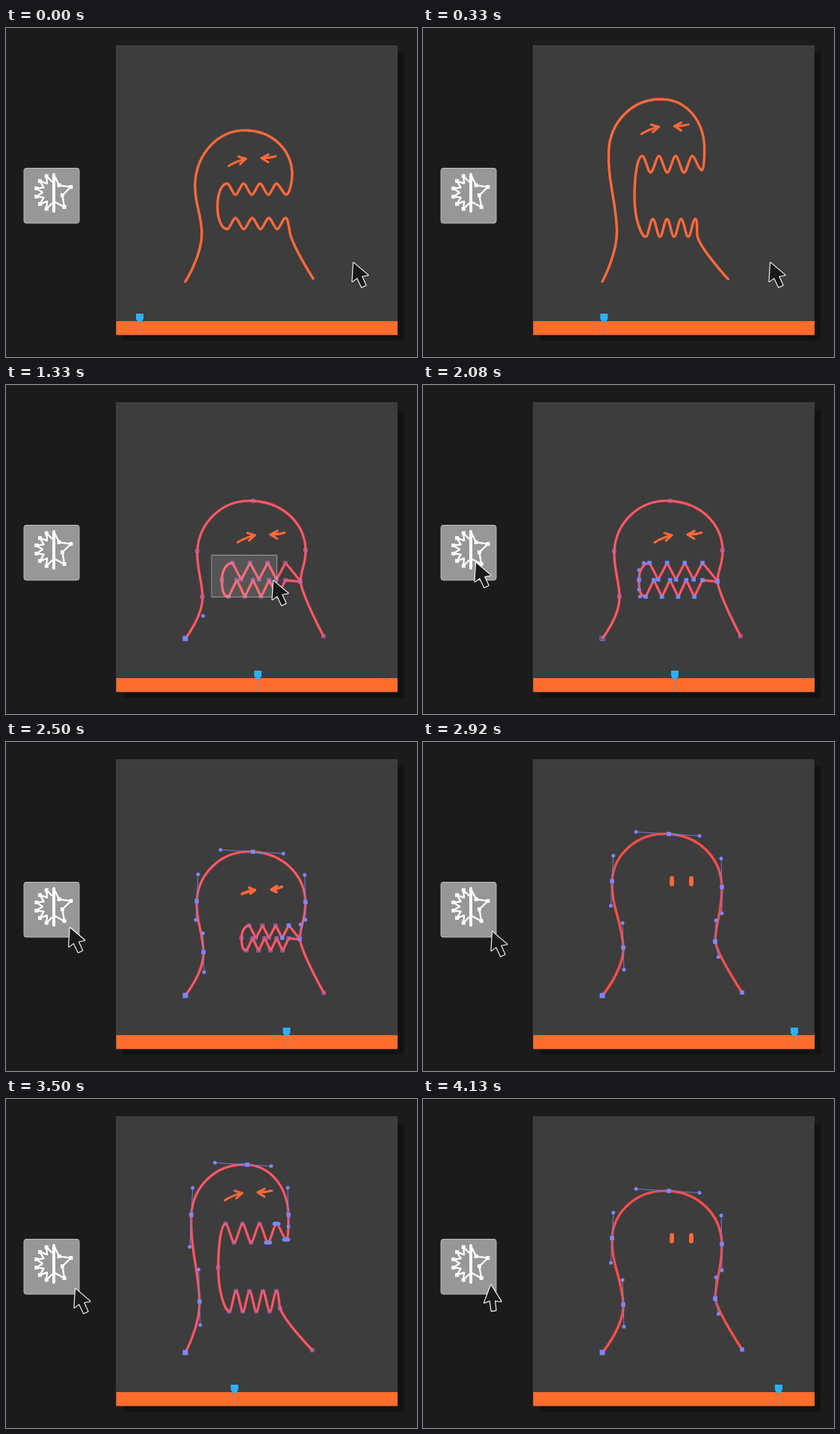
An HTML page with a canvas for the animation above (4250 ms loop, 550 by 440 pixels).

```html
<!DOCTYPE html>
<html lang="en">
<head>
<meta charset="utf-8">
<title>Shape morph</title>
<style>
  html, body { margin: 0; width: 100%; height: 100%; overflow: hidden; background: #1b1b1b; }
  canvas { display: block; }
</style>
</head>
<body>
<canvas id="stage" width="550" height="440"></canvas>
<script>
const ctx = document.getElementById('stage').getContext('2d');
const LOOP = 4250;
const ORANGE = '#ff693b', BLUE = '#7f85fa';

const mix = (a, b, t) => Array.isArray(a) ? a.map((v, i) => mix(v, b[i], t)) : a + (b - a) * t;
const smooth = t => t * t * (3 - 2 * t);
const polar = (x, y, angle, r) => [x + r * Math.cos(angle), y + r * Math.sin(angle)];

// A row of teeth: points evenly spaced along x, alternating between two heights.
const teeth = (count, [x0, x1], ys, phase) => Array.from({ length: count }, (_, i) =>
  [mix(x0, x1, i / (count - 1)), ys[(i + phase) % 2]]);

// Anchors are [x, y, inX, inY, outX, outY] with relative handles, sized from the gaps between anchors.
function makePose({ waist, left, top, right, foot, jaws, upper, lower, back, round, eyes, eyeWidth }) {
  const heel = [240, 339];
  const [upperJaw, lowerJaw] = jaws;
  const upright = ([x, y], below, above, lean) => [x, y, lean * below, below, -lean * above, -above];
  const side = .37 * (waist[1] - left[1]), dome = .54;
  const rise = dome * (left[1] - top[1]), neck = upperJaw[1] - right[1];
  const crownLeft = dome * 1.07 * (top[0] - left[0]), crownRight = dome * 1.07 * (right[0] - top[0]);
  const head = [
    upright(waist, .46 * (heel[1] - waist[1]), side, .03),
    upright(left, side, rise, -.05),
    [...top, -crownLeft, -.06 * crownLeft, crownRight, .06 * crownRight],
    [...right, -1, -dome * (right[1] - top[1]), 0, .48 * neck]
  ];

  const upperTeeth = teeth(7, upper.x, upper.y, 1).map(p => [...p, round, 0, -round, 0]);
  const lowerTeeth = teeth(8, lower.x, lower.y, 0).map(p => [...p, -round, 0, round, 0]);
  const throatTop = upperTeeth.at(-1), throatEnd = lowerTeeth[0];
  const curl = .55 * (throatTop[0] - back), bow = .29 * (throatEnd[1] - throatTop[1]);
  throatTop[4] = throatEnd[2] = -curl;
  const throat = [back, (throatTop[1] + throatEnd[1]) / 2, 0, -bow, 0, bow];

  const isOpen = round > 1;
  const legX = .12 * (foot[0] - lowerJaw[0]), legY = .3 * (foot[1] - lowerJaw[1]);
  const bend = isOpen ? -.4 : 0;
  return [[
    [...heel, 0, 0, 0, 0], ...head,
    [...upperJaw, isOpen ? round : 1, isOpen ? 0 : -.39 * neck, -round, 0],
    ...upperTeeth, throat, ...lowerTeeth,
    [...lowerJaw, bend * legX, bend * legY, legX, legY],
    [...foot, 0, 0, 0, 0]
  ], eyes, eyeWidth];
}

// Eye points: tail, bend, tip, two barbs.
function arrow(x, y, axis, length) {
  return [polar(x, y, axis - .17, length), polar(x, y, axis, length / 2), [x, y],
          polar(x, y, axis - .52, 10.5), polar(x, y, axis + .52, 10.5)];
}
const angryEyes = (x, y) => [arrow(x, y, 2.92, 25), arrow(x + 21, y - 1, .04, 19)];
const dotEyes = [333, 359].map(x => [182, 186, 190, 186, 186].map(y => [x, y]));

const ghost = makePose({
  waist: [268, 275], left: [253, 186], top: [329, 123], right: [400, 194], foot: [427, 335],
  jaws: [[391, 267], [391, 267]], back: 391, round: 0,
  upper: { x: [391, 391], y: [267, 267] }, lower: { x: [391, 391], y: [267, 267] },
  eyes: dotEyes, eyeWidth: 5.6
});
const roar = makePose({
  waist: [262, 273], left: [253, 208], top: [324, 137], right: [383, 195], foot: [411, 335],
  jaws: [[375, 223], [380, 274]], back: 283, round: 3.5,
  upper: { x: [362, 296], y: [223, 208] }, lower: { x: [296, 374], y: [269, 254] },
  eyes: angryEyes(321, 175), eyeWidth: 3
});
const stretch = makePose({
  waist: [259, 271], left: [248, 155], top: [323, 88], right: [378, 155], foot: [410, 336],
  jaws: [[375, 188], [367, 280]], back: 284, round: 3,
  upper: { x: [362, 294], y: [192, 167] }, lower: { x: [299, 362], y: [284, 257] },
  eyes: angryEyes(316, 126), eyeWidth: 3
});
const bite = makePose({
  waist: [263, 283], left: [256, 222], top: [331, 155], right: [401, 221], foot: [425, 336],
  jaws: [[394, 262], [394, 263]], back: 289, round: .6,
  upper: { x: [374, 303], y: [260, 238] }, lower: { x: [298, 374], y: [283, 261] },
  eyes: angryEyes(333, 201), eyeWidth: 3
});
const peak = mix(bite, stretch, 1.2);

// Playhead position -> pose
const poseKeys = [[147, ghost], [179, roar], [282, peak], [306, stretch], [337, bite], [453, ghost]];
// Step -> cursor x, y, angle
const cursorKeys = [
  [10, [465, 314, 0]], [12, [398, 266, 0]], [14, [272, 212, 0]], [16, [358, 262, 0]], [20, [389, 286, 0]],
  [21, [386, 285, 0]], [25, [71, 238, 0]], [28, [71, 238, 0]], [31, [93, 254, 0]], [46, [93, 254, 0]],
  [49, [91, 249, .31]]
];

function sample(keys, at, ease = t => t) {
  const next = keys.findIndex(key => key[0] > at);
  if (next < 0) return keys.at(-1)[1];
  if (next === 0) return keys[0][1];
  const [t0, a] = keys[next - 1], [t1, b] = keys[next];
  return mix(a, b, ease((at - t0) / (t1 - t0)));
}

function playheadAt(step) {
  if (step < 29) return 179 + 15.8 * Math.min(step, 10);
  return step < 36 ? 497 + 24.3 * (step - 35) : 160 + 24.3 * (step - 36);
}

function line(points, color, width, close) {
  ctx.beginPath();
  points.forEach(([x, y]) => ctx.lineTo(x, y));
  if (close) ctx.closePath();
  ctx.strokeStyle = color;
  ctx.lineWidth = width;
  ctx.stroke();
}

function square(x, y, size, color, hollow) {
  ctx.fillStyle = ctx.strokeStyle = color;
  ctx.lineWidth = 1;
  if (hollow) ctx.strokeRect(x - size / 2, y - size / 2, size, size);
  else ctx.fillRect(x - size / 2, y - size / 2, size, size);
}

function dot(x, y) {
  ctx.fillStyle = BLUE;
  ctx.beginPath();
  ctx.arc(x, y, 2.5, 0, 7);
  ctx.fill();
}

// Half a star around the icon's centre, with square handles on some of its corners.
function halfStar(from, to, count, radii, hasSquare) {
  const corners = Array.from({ length: count }, (_, i) =>
    polar(64, 220, mix(from, to, i / (count - 1)) * Math.PI, radii[i % 2]));
  line(corners, '#fff', 2.3);
  corners.forEach(([x, y], i) => hasSquare(i) && square(x, y, 5, '#fff'));
}

function drawButton(pressed) {
  ctx.fillStyle = pressed ? '#7c7c7c' : '#979797';
  ctx.beginPath();
  ctx.roundRect(24, 187.5, 74, 73.5, 3);
  ctx.fill();
  ctx.strokeStyle = '#bdbdbd';
  ctx.lineWidth = 1;
  ctx.stroke();
  line([[64, 196], [64, 245]], '#fff', 4);
  halfStar(.56, 1.44, 13, [15, 24], i => i % 2);
  halfStar(-.5, .5, 6, [24, 12], i => i > 0 && i < 5);
}

function drawBoard(playhead) {
  ctx.save();
  ctx.filter = 'blur(1px)';
  ctx.fillStyle = '#121212';
  ctx.fillRect(157, 33, 375, 385);
  ctx.restore();
  ctx.fillStyle = '#3d3d3d';
  ctx.fillRect(147, 23, 377, 388);
  ctx.fillStyle = '#ff6d2d';
  ctx.fillRect(147.5, 392, 376.5, 18.5);
  line([[playhead, 393], [playhead, 410]], 'rgba(120,140,165,.75)', 1);
  ctx.fillStyle = '#2db0fa';
  ctx.beginPath();
  [[-5, 382], [5, 382], [5, 389], [2.5, 393], [-2.5, 393], [-5, 389]]
    .forEach(([x, y]) => ctx.lineTo(playhead + x, y));
  ctx.fill();
}

function drawEye([tail, bend, tip, ...barbs], width) {
  ctx.beginPath();
  ctx.moveTo(...tail);
  ctx.quadraticCurveTo(...bend, ...tip);
  ctx.strokeStyle = ORANGE;
  ctx.lineWidth = width;
  ctx.stroke();
  line([barbs[0], tip, barbs[1]], ORANGE, width);
}

function drawBody(anchors, selected, hasMouth) {
  ctx.beginPath();
  ctx.moveTo(anchors[0][0], anchors[0][1]);
  anchors.slice(1).forEach(([x, y, inX, inY], i) => {
    const [px, py, , , outX, outY] = anchors[i];
    ctx.bezierCurveTo(px + outX, py + outY, x + inX, y + inY, x, y);
  });
  ctx.strokeStyle = selected ? '#f54e4b' : ORANGE;
  ctx.lineWidth = 3.4;
  ctx.stroke();
  if (selected && hasMouth) {
    ctx.strokeStyle = 'rgba(245,100,150,.7)';
    ctx.lineWidth = 1.5;
    ctx.stroke();
  }
}

function drawHandles([x, y, inX, inY, outX, outY]) {
  [[inX, inY], [outX, outY]].forEach(([dx, dy]) => {
    if (Math.hypot(dx, dy) < 1.5) return;
    line([[x, y], [x + dx, y + dy]], '#777bd0', 1);
    dot(x + dx, y + dy);
  });
}

function drawAnchors(anchors, mode, hasMouth) {
  const last = anchors.length - 1, throat = 13;
  const isSolid = i => ({
    start: i === 0,
    mouth: i > 4 && i < last,
    head: i < 8 || !hasMouth
  })[mode];
  if (mode === 'start') dot(anchors[1][0] + anchors[1][2], anchors[1][1] + anchors[1][3]);
  anchors.forEach((anchor, i) => {
    const [x, y] = anchor, solid = isSolid(i);
    if (solid && (mode === 'head' || Math.abs(i - throat) < 2)) drawHandles(anchor);
    const size = (solid ? 5.6 : 4.2) + (i ? 0 : 1.4);
    square(x, y, size, solid || i === 0 ? BLUE : '#b565bd', !solid);
  });
}

function drawCursor([x, y, angle]) {
  ctx.save();
  ctx.translate(x, y);
  ctx.rotate(angle);
  line([[0, 0], [-1.5, 25], [5, 20], [11, 32.5], [16.5, 30], [11, 18], [19.5, 16.5]], '#fff', 2.2, true);
  ctx.fillStyle = '#191919';
  ctx.fill();
  ctx.restore();
}

function drawMarquee([x, y]) {
  const box = [275.5, 227.5, x + 4 - 275, y + 21 - 227];
  ctx.fillStyle = 'rgba(255,255,255,.12)';
  ctx.fillRect(...box);
  ctx.strokeStyle = 'rgba(210,210,210,.6)';
  ctx.lineWidth = 1;
  ctx.strokeRect(...box);
}

function selectionMode(step) {
  if (step < 12) return null;
  return step < 21 ? 'start' : step < 28 ? 'mouth' : 'head';
}

function draw(ms) {
  // The picture advances at 12 steps per second; the final step comes slightly late.
  const step = ms >= 4130 ? 49 : Math.min(48, Math.floor((ms + 4) * .012));
  const playhead = playheadAt(step);
  const eased = playhead > 179 && playhead < 282 || playhead > 337;
  const [anchors, eyes, eyeWidth] = sample(poseKeys, playhead, eased ? smooth : undefined);
  const cursor = sample(cursorKeys, step);
  const mode = selectionMode(step);
  const hasMouth = playhead < 450;

  ctx.fillStyle = '#1b1b1b';
  ctx.fillRect(0, 0, 550, 440);
  ctx.lineCap = ctx.lineJoin = 'round';
  drawBoard(playhead);
  drawButton(step >= 27 && step < 30);
  eyes.forEach(eye => drawEye(eye, eyeWidth));
  drawBody(anchors, mode, hasMouth);
  if (mode) drawAnchors(anchors, mode, hasMouth);
  if (step >= 15 && step < 21) drawMarquee(cursor);
  drawCursor(cursor);
}

const start = performance.now();
function tick() {
  draw((performance.now() - start) % LOOP);
  requestAnimationFrame(tick);
}
tick();
</script>
</body>
</html>
```
